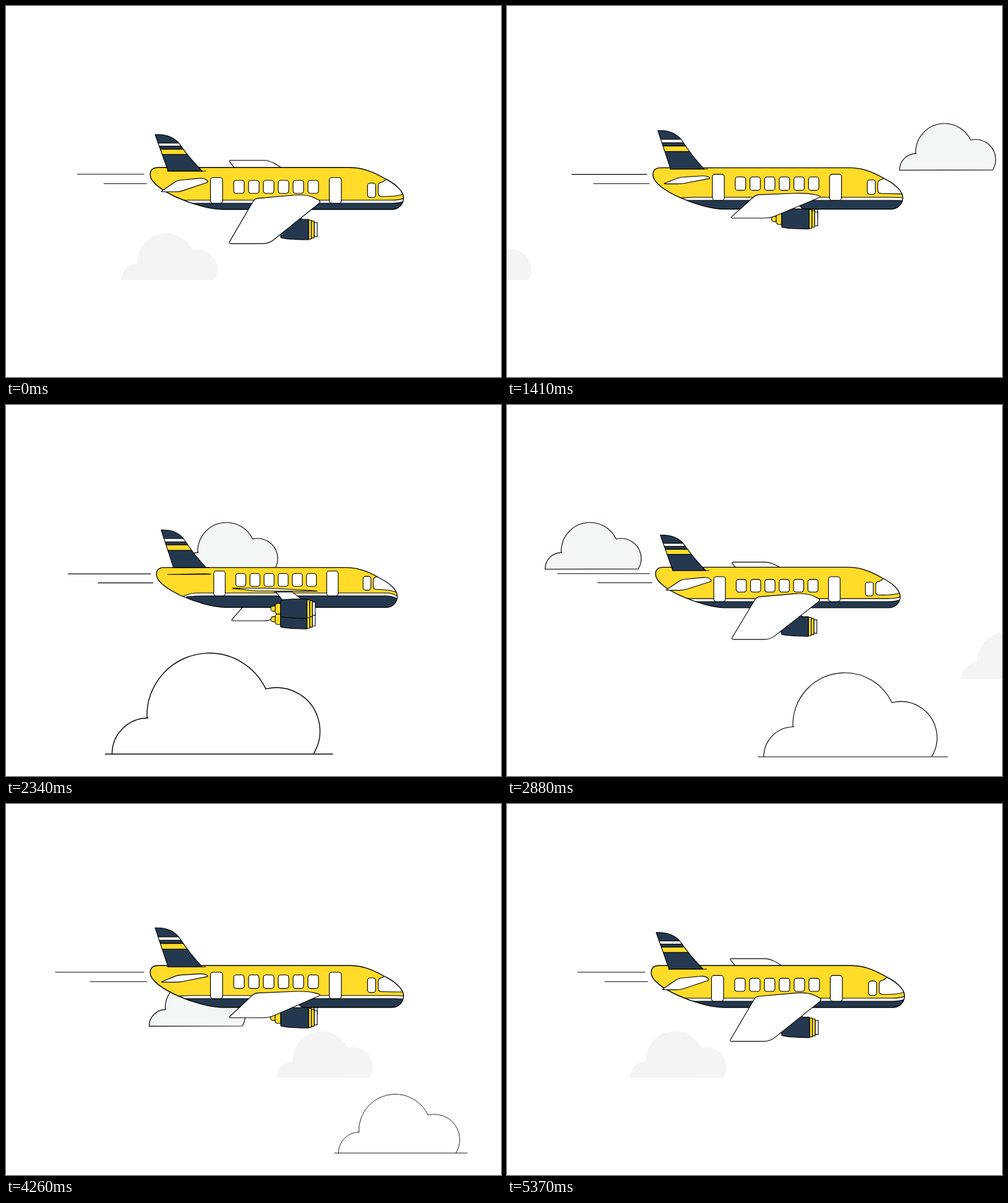
An HTML page with a canvas that plays this animation: 800x600 px, repeating every 5.4 s.

```html
<!DOCTYPE html>
<html lang="en">
<head>
<meta charset="utf-8">
<title>Banking plane</title>
<style>
html, body { margin: 0; width: 100%; height: 100%; overflow: hidden; background: #fff; }
canvas { display: block; }
</style>
</head>
<body>
<canvas id="stage" width="800" height="600"></canvas>
<script>
const ctx = document.getElementById('stage').getContext('2d');
const YELLOW = '#ffdb2a', NAVY = '#24394f', WHITE = '#fff', INK = '#000';
const LOOP = 5400, STEP = 30, CX = 437.8, CY = 295;

// Keyframes: time, value, time, value, ...
const ROLL = [0, 89, 600, 30, 1200, 89, 1840, -71, 2900, 87, 3620, 14, 4110, 60.5, 4650, 8, 5400, 89];
const SCALE = [1200, 1, 1800, .951, 2680, .951, 3450, 1.038, 3975, 1];
const TRAIL_1 = [0, -323, 450, -346, 930, -335, 1800, -340.5, 2880, -369.4, 3660, -357, 4260, -358.3, 4480, -370, 5400, -324];
const TRAIL_2 = [0, -280, 500, -303, 930, -297, 1800, -307, 2880, -302, 3660, -305, 4260, -302.3, 4600, -304, 5400, -280];

function ease(keys, t) {
  if (t <= keys[0]) return keys[1];
  for (let i = 2; i < keys.length; i += 2) {
    if (t < keys[i]) {
      const u = (t - keys[i - 2]) / (keys[i] - keys[i - 2]);
      return keys[i - 1] + (keys[i + 1] - keys[i - 1]) * u * u * (3 - 2 * u);
    }
  }
  return keys[keys.length - 1];
}

// Blend of a value in three poses: seen from above, level, from below.
let roll = 0;
function pose(above, level, below) {
  const s1 = (above - level) / 74.4, s2 = (level - below) / 84;
  return level + (roll - 14.6) * (s1 + (s1 - s2) / 158.4 * (roll - 89));
}

function paint(path, fill, width = 1.15) {
  if (fill) { ctx.fillStyle = fill; ctx.fill(path); }
  if (width) { ctx.strokeStyle = INK; ctx.lineWidth = width; ctx.stroke(path); }
}

function line(x1, y1, x2, y2, width = 1.15) {
  const p = new Path2D();
  p.moveTo(x1, y1);
  p.lineTo(x2, y2);
  paint(p, null, width);
}

function box(x, y, w, h, r, fill = WHITE) {
  const p = new Path2D();
  p.roundRect(x, y, w, h, r);
  paint(p, fill);
}

// Polygon of [x, y, corner cut] points with softened corners.
function softPoly(pts, fill) {
  const p = new Path2D(), n = pts.length;
  const toward = (a, b) => {
    const len = Math.hypot(b[0] - a[0], b[1] - a[1]) || 1;
    const k = Math.min(a[2] / len, .5);
    return [a[0] + (b[0] - a[0]) * k, a[1] + (b[1] - a[1]) * k];
  };
  pts.forEach((c, i) => {
    const from = toward(c, pts[(i + n - 1) % n]), to = toward(c, pts[(i + 1) % n]);
    p[i ? 'lineTo' : 'moveTo'](...from);
    p.quadraticCurveTo(c[0], c[1], ...to);
  });
  p.closePath();
  paint(p, fill);
}

function cloud(x, base, size, fill, outline, ground) {
  if (x + 170 * size < 0 || x - 145 * size > 800) return;
  const p = new Path2D();
  p.arc(-82.5, 0, 48.5, Math.PI, 1.5 * Math.PI);
  p.arc(0, -52, 84, 3.106, 5.843);
  p.arc(90.5, -31, 58.5, 4.47, 6.83);
  if (!ground) p.closePath();
  ctx.save();
  ctx.translate(x, base);
  ctx.scale(size, size);
  paint(p, fill, outline / size);
  if (ground) line(-140.5, 0, 166.5, 0, outline / size);
  ctx.restore();
}

function clouds(t) {
  cloud(t < 2000 ? 259 - .215 * t : 271.5 + .215 * (5370 - t), 443.3, .557, '#f4f4f4', 0);
  const u = t - 1800;
  cloud(565 - .3735 * u - 2.35e-5 * u * u, 265.5, .555, '#f2f6f5', 1.15);
  if (t > 2800) {
    const a = t - 3420, b = t - 3660, c = t - 4260;
    cloud(713 - .4667 * a - 3.37e-5 * a * b + 4.6e-8 * a * b * c, 359.3, .555, '#f2f6f5', 1.15);
  }
  cloud(148.5 + 930 - t, 569, 1, WHITE, 1.15, true);
  cloud(868.6 + 1800 - t, 564.5, 1.2, WHITE, 1.4, true);
  cloud(546 + 2880 - t, 569, 1, WHITE, 1.15, true);
  cloud(629 + 4260 - t, 564.5, .7, WHITE, .85, true);
}

function wing(tip, rootL, crest, rootR) {
  softPoly([[359.5, tip, 4], [402, rootL, 5], [486, crest, 22], [510, rootR, 6], [425, tip, 10]], WHITE);
}

function stabiliser(tip, rootL, crest, rootR) {
  softPoly([[250, tip, 3], [277, rootL, 5], [320, crest, 6], [328, rootR, 4], [280, tip, 6]], WHITE);
}

function engine(y) {
  softPoly([[436, y - 28.5, 0], [464, y - 28.5, 0], [481, y - 15, 0], [447, y - 15, 0]], WHITE);
  line(432.5, y - 28.5, 465, y - 28.5);
  box(427.5, y - 4.3, 9, 8.6, [4, 0, 0, 4], YELLOW);
  box(435, y - 9, 9, 18, [4, 0, 0, 4], YELLOW);
  box(498, y - 11.3, 5, 22.6, 0);
  box(493.5, y - 13.6, 4.5, 27.2, 0, YELLOW);
  box(489, y - 15.3, 4.5, 30.6, 0, YELLOW);
  paint(new Path2D(`M489 ${y - 16.5}H465Q446 ${y - 16} 444 ${y - 13}V${y + 13}Q450 ${y + 16} 489 ${y + 16.5}Z`), NAVY);
}

const hull = new Path2D(`M246 261.2H557C580 261.2 600 272 614 280C628 287 642.5 299 642.5 310
  C642.5 321 634 329 623 329H350C312 329 233 297 233 273C233 265 238 261.2 246 261.2Z`);

function stripe(x, y, nose, fill) {
  const start = Math.max(311, y);
  paint(new Path2D(`M${x} ${start}C${x + 9} ${(start + y) / 2} ${x + 14} ${y} ${x + 28} ${y}H622
    C634 ${y} 640 ${(y + nose) / 2} 643 ${nose}L650 345H${x}Z`), fill);
}

function body() {
  paint(hull, YELLOW, 0);
  ctx.save();
  ctx.clip(hull);
  const y = pose(314, 305.8, 297.1);
  stripe(276, y, 310.5, WHITE);
  stripe(284, y + 5, 315.5, NAVY);
  const top = pose(286, 279, 275), low = pose(308, 299.7, 292);
  paint(new Path2D(`M601.5 ${low - 5}V${top + 5}Q601.5 ${top} 607 ${top - 1}Q611 ${top - 2} 615 ${top - 7}
    L660 265V304H643Q632 ${low + .5} 608 ${low}Q601.5 ${low} 601.5 ${low - 5}Z`), WHITE);
  ctx.restore();
  paint(hull, null, 1.4);

  const winTop = pose(282, 272.5, 267.7), winH = pose(21, 22, 19.5);
  for (let i = 0; i < 6; i++) box(368 + 24 * i, winTop, 17, winH, 4);
  const doorTop = pose(277.5, 268.2, 264), doorH = pose(41.5, 42.7, 37.8);
  for (const x of [330.5, 522.5]) box(x, doorTop, 19.5, doorH, 4);
  box(584.3, pose(286.5, 277.4, 272.4), 13.2, pose(23, 23.5, 21), 4);
}

function fin() {
  const tip = pose(208, 197.4, 206.7), base = pose(267, 261.4, 260.9);
  const at = v => tip + (base - tip) * v;
  const shape = new Path2D(`M241 ${at(0)}Q268 ${at(-.02)} 281 ${at(.27)}Q297 ${at(.66)} 317 ${at(1)}H262Z`);
  paint(shape, NAVY, 0);
  ctx.save();
  ctx.clip(shape);
  for (const [a, b, fill] of [[.23, .315, WHITE], [.4, .545, YELLOW]])
    box(230, at(a), 100, at(b) - at(a), 0, fill);
  ctx.restore();
  paint(shape);
  line(260.5, base, 323, base);
}

function plane(t) {
  roll = ease(ROLL, t);
  const size = ease(SCALE, t);
  ctx.save();
  ctx.translate(CX, CY);
  ctx.scale(size, size);
  line(ease(TRAIL_1, t), -23, -214.3, -23);
  line(ease(TRAIL_2, t), -7.8, -210.2, -7.8);
  ctx.translate(-CX, -CY);

  stabiliser(pose(264, 283, 309), 275, 275, 275);
  wing(pose(249.5, 340, 392.8), pose(303, 302, 314), 302, pose(300, 302, 324));
  engine(pose(312, 344, 373.3));
  body();
  fin();
  stabiliser(pose(300.5, 277, 252.4), pose(282, 273.5, 270), pose(278, 272.3, 273.7), pose(284.5, 274, 266.5));

  const nearEngine = pose(361.5, 334.5, 321.3);
  if (roll > 0) engine(nearEngine);
  wing(pose(384.3, 309.6, 225.6), pose(311.5, 302, 299.2), pose(304, 301.6, 303), pose(316, 302.8, 295.5));
  if (roll <= 0) engine(nearEngine);
  ctx.restore();
}

function draw() {
  const t = Math.floor(performance.now() % LOOP / STEP) * STEP;
  ctx.fillStyle = WHITE;
  ctx.fillRect(0, 0, 800, 600);
  ctx.lineJoin = 'round';
  clouds(t);
  plane(t);
  requestAnimationFrame(draw);
}
draw();
</script>
</body>
</html>
```
